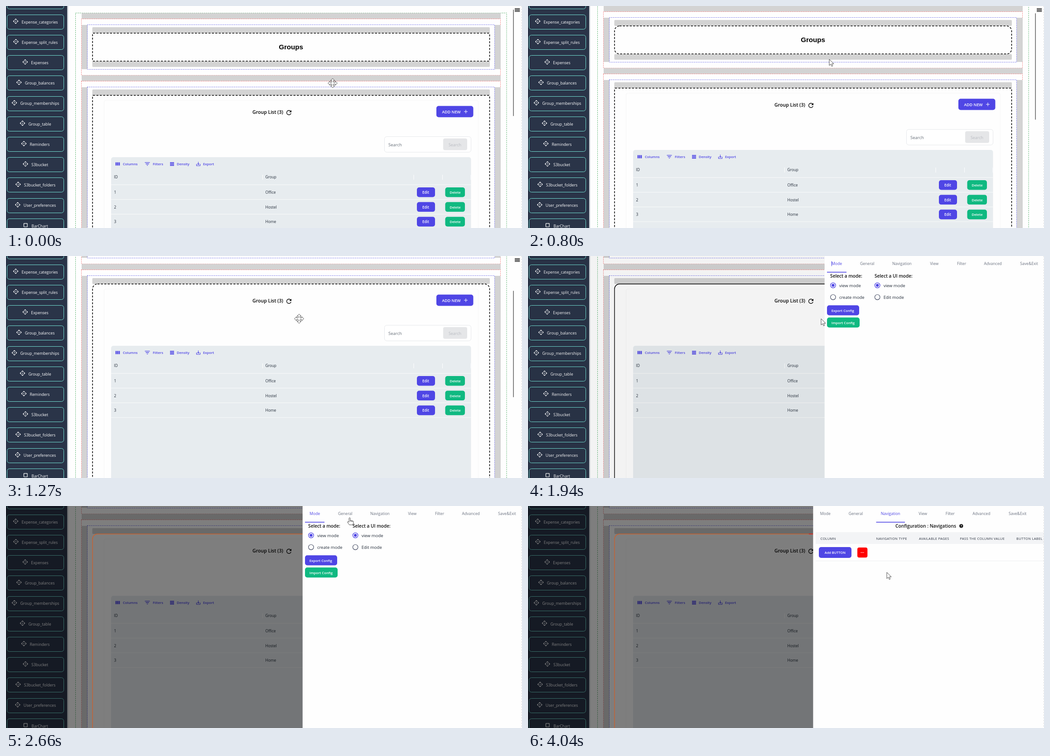
Write an HTML page that moves like this. It is 1139 by 492 pixels and loops after 4.11 s.

```html
<!DOCTYPE html>
<html lang="en">
<head>
<meta charset="utf-8">
<title>Page builder</title>
<style>
html, body { margin: 0; width: 100%; height: 100%; overflow: hidden; background: #fff; }
svg { display: block; width: 100vw; height: 100vh; }
text { font-family: "Open Sans", "Noto Sans", sans-serif; white-space: pre; }
</style>
</head>
<body>
<svg id="stage" viewBox="0 0 1139 492" preserveAspectRatio="none"></svg>
<script>
const LOOP = 4110;
const INDIGO = '#4f46e5', GREEN = '#10b981', GRAY = '#d3d3d3', INK = '#222b38';

// ---- markup helpers
const rect = (x, y, w, h, fill, rx = 0, more = '') =>
  `<rect x="${x}" y="${y}" width="${w}" height="${h}" rx="${rx}" fill="${fill}" ${more}/>`;
const frame = (x, y, w, h, color, dash, more = '') =>
  rect(x, y, w, h, 'none', 0, `stroke="${color}" stroke-dasharray="${dash}" ${more}`);
const path = (d, more) => `<path d="${d}" ${more}/>`;
const text = (x, y, s, size, fill = INK, weight = 400, more = '') =>
  `<text x="${x}" y="${y}" font-size="${size}" fill="${fill}" font-weight="${weight}" ${more}>${s}</text>`;
const button = (x, y, w, h, fill, label, tx, ty, size = 7.7) =>
  rect(x, y, w, h, fill, 5) + text(tx, ty, label, size, '#fff', 600);

// ---- sidebar
function sidebar() {
  const names = ['', 'Expense_categories', 'Expense_split_rules', 'Expenses', 'Group_balances',
    'Group_memberships', 'Group_table', 'Reminders', 'S3bucket', 'S3bucket_folders',
    'User_preferences', 'BarChart'];
  const rows = names.map((name, i) => {
    const y = 35.3 + 45.2 * (i - 1);
    return rect(2.5, Math.floor(y - 16) + .5, 125, 32, 'none', 5, 'stroke="#72ded2"') +
      text(74.5, y + 3.3, name, 8.75, '#fff', 500, 'class="item" text-anchor="middle"');
  });
  return rect(0, 0, 135, 492, '#2a3448') + rect(135, 0, 2.5, 492, '#cfd3d9') + rows.join('');
}

function arrows() {
  let out = '<circle r="1" fill="#fff"/>';
  for (let a = 0; a < 360; a += 90)
    out += path('M-2.1-3L0-5.1 2.1-3', `transform="rotate(${a})" fill="none" stroke="#fff" stroke-width="1.3"`);
  return out;
}

function addIcons() {
  document.querySelectorAll('.item').forEach(el => {
    const label = el.textContent;
    if (!label) return;
    const icon = label === 'BarChart'
      ? rect(-3.8, -3.8, 7.6, 7.6, 'none', .5, 'stroke="#fff" stroke-width="1.2"')
      : arrows();
    const x = 74.5 - el.getComputedTextLength() / 2 - 13, y = el.getAttribute('y') - 4.9;
    el.insertAdjacentHTML('afterend', `<g transform="translate(${x},${y})">${icon}</g>`);
  });
}

// ---- page canvas
const box = (id, y, h) => rect(191, y, 876.5, h, 'none', 1,
  `id="${id}" stroke="#000" stroke-width="1.5" stroke-dasharray="4.5 3"`);

function section(y, h) {
  return frame(166.5, y, 925, h, '#f26a6a', '2 2') +
    rect(167, y + 13.5, 13, h - 27, GRAY, 1) + rect(1079, y + 13.5, 13, h - 27, GRAY, 1) +
    frame(179.5, y + 13, 899, h - 26, '#5f5fe6', '2 2') +
    rect(190.5, y + 18.5, 877.5, 13, GRAY, 2);
}

function toolbar() {
  const stroke = `stroke="${INDIGO}" fill="none"`;
  return path('M243 346.5v7M246.5 346.5v7M250 346.5v7', stroke + ' stroke-width="2.6"') +
    path('M306.5 346.8h11M308.5 350h7M310.8 353.2h2.5', stroke + ' stroke-width="1.3"') +
    path('M362 347.2h9M362 350.2h9M362 353.2h9', stroke + ' stroke-width="2"') +
    path('M420.5 350v4h8v-4M424.5 345.5v6M422.5 349.5l2 2 2-2', stroke + ' stroke-width="1.1"') +
    [['Columns', 258], ['Filters', 324], ['Density', 377], ['Export', 435]]
      .map(([s, x]) => text(x, 353, s, 7.7, INDIGO, 600)).join('');
}

function table() {
  let out = rect(232, 335, 794.5, 400, '#e7ecef', 5) + toolbar() +
    text(238.5, 382, 'ID', 8.3) + text(572.5, 382, 'Group', 8.3);
  for (const x of [566.5, 900, 963.5, 1026]) out += rect(x - .6, 374, 1.2, 11, '#fafbfc');
  ['Office', 'Hostel', 'Home'].forEach((name, i) => {
    const y = 396 + 32.6 * i;
    out += text(238.5, y + 20, i + 1, 8.4) + text(572.5, y + 20, name, 8.4) +
      button(907, y + 6, 40, 21.5, INDIGO, 'Edit', 919, y + 20, 8) +
      button(969.5, y + 6, 43.5, 21.5, GREEN, 'Delete', 979.5, y + 20, 7.7);
  });
  for (let i = 0; i < 4; i++) out += rect(232, 395.6 + 32.6 * i, 794.5, 1.1, '#f8fafa');
  return out;
}

const REFRESH = 'M17.65 6.35C16.2 4.9 14.21 4 12 4a8 8 0 1 0 7.73 10h-2.08A6 6 0 1 1 12 6c1.66 0 3.14.69 4.22 1.78L13 11h7V4z';

function page() {
  return frame(153.5, 15.5, 951.5, 900, '#54b06a', '2.5 2') +
    rect(167, 15.5, 925, 13, GRAY, 1) + section(28.5, 125) + rect(190.5, 122.5, 877.5, 12.5, GRAY, 2) +
    rect(167, 153.5, 925, 13, GRAY, 1) + section(166.5, 800) +
    rect(191, 60.5, 877, 62, '#fefefe') +
    text(629, 96, 'Groups', 15.1, '#000', 700,
      'text-anchor="middle" style="font-family:\'Liberation Sans\',Arial,sans-serif"') +
    rect(216.5, 209, 826, 600, 'none', 4, 'stroke="#f6f6f6"') +
    box('groups', 60.3, 62) + box('list', 198, 520) +
    text(544, 239, 'Group List (3)', 10.55, '#000', 600) +
    path(REFRESH, 'transform="translate(616.2,228) scale(.69)" fill="#000"') +
    button(950, 221.5, 81.5, 25, INDIGO, 'ADD NEW', 962.5, 237.5, 8.8) +
    path('M1011 234h8M1015 230v8', 'stroke="#fff"') +
    rect(835.5, 289.5, 191, 34.5, '#fff', 5, 'stroke="#e6e8eb"') + text(844, 311, 'Search', 9.5, '#666e78') +
    rect(965, 293.5, 53, 26, '#e5e6e8', 4) + text(977, 311, 'Search', 8.9, '#b9bcc2') +
    table();
}

// ---- settings drawer
function modeView() {
  const column = (x, title, second) =>
    text(x - 6.3, 48, title, 10.1, '#111', 600) +
    `<circle cx="${x}" cy="65" r="5.7" fill="none" stroke="${INDIGO}" stroke-width="1.3"/>
     <circle cx="${x}" cy="65" r="3.2" fill="${INDIGO}"/>
     <circle cx="${x}" cy="91.2" r="5.7" fill="none" stroke="#4b5268" stroke-width="1.2"/>` +
    text(x + 13.5, 69, 'view mode', 9.5) + text(x + 13.5, 95.3, second, 9.5);
  return column(673.4, 'Select a mode:', 'create mode') + column(771.2, 'Select a UI mode:', 'Edit mode') +
    button(660, 109.3, 71, 22.2, INDIGO, 'Export Config', 669.8, 124) +
    button(660, 136.2, 72, 22.2, GREEN, 'Import Config', 669.8, 151);
}

function navView() {
  const heads = [['COLUMN', 645.5], ['NAVIGATION TYPE', 768.5], ['AVAILABLE PAGES', 863],
    ['PASS THE COLUMN VALUE', 953.5], ['BUTTON LABEL', 1078]];
  return text(878, 48, 'Configuration : Navigations', 10.2, '#111', 600, 'text-anchor="middle"') +
    '<circle cx="956.3" cy="44.3" r="4.2" fill="#111"/>' +
    text(956.3, 47, '?', 7, '#fff', 700, 'text-anchor="middle"') +
    rect(635, 58, 504, 26, '#f3f4f6') +
    heads.map(([s, x]) => text(x, 74.7, s, 7.5, '#2c3340', 500, 'letter-spacing=".35"')).join('') +
    button(642, 91, 72, 24, INDIGO, 'Add BUTTON', 654.8, 106.2, 7.4) +
    rect(727, 92, 22.3, 22.3, '#f00', 4) + rect(734, 102.6, 8, 1, '#ffc9c9') +
    rect(635, 121.3, 504, 1, '#eeeff1');
}

const TABS = [['Mode', 670], ['General', 733], ['Navigation', 804], ['View', 887.5],
  ['Filter', 947], ['Advanced', 1006.5], ['Save&amp;Exit', 1086.3]];

const drawer = () => rect(654.7, 0, 510, 492, '#fefefe', 0, 'id="sheet"') +
  `<g id="tabs">${TABS.map(([s, x]) => text(x, 20.3, s, 8.6, '#6b7280', 400, 'class="tab"')).join('')}
   ${rect(669.8, 11.5, 1, 11, INDIGO, 0, 'id="caret"')}</g>
   ${rect(660, 35, 43, 1.6, INDIGO, 0, 'id="bar"')}
   <g id="mode">${modeView()}</g><g id="nav">${navView()}</g>`;

// ---- pointers
function moveShape() {
  const corner = [[0, -10.3], [4.6, -5.8], [1.9, -5.8], [1.9, -1.9], [5.8, -1.9], [5.8, -4.6]];
  const pts = [];
  for (let q = 0; q < 4; q++)
    for (let [x, y] of corner) {
      for (let i = 0; i < q; i++) [x, y] = [-y, x];
      pts.push(x + ' ' + y);
    }
  return `M${pts.join('L')}Z`;
}
const POINTERS = {
  move: moveShape(),
  arrow: 'M0 0V13.8L3.3 10.9 5.5 15.8 7.7 14.8 5.6 10.1H10Z',
  hand: 'M-1.4 1.4A1.4 1.4 0 0 1 1.4 1.4V6L7.2 7.2Q9 7.8 8.7 9.8L7.2 15.8H-.5L-4.6 10.4Q-5 8.6-3.4 8.5L-1.4 10ZM1.4 6V8.5M3.8 6.8V9M6.2 7.2V9.4'
};

const $ = id => document.getElementById(id);
const set = (id, attrs) => { for (const k in attrs) $(id).setAttribute(k, attrs[k]); };
const show = (id, on) => set(id, { visibility: on ? 'visible' : 'hidden' });

$('stage').innerHTML = rect(0, 0, 1139, 492, '#fefefe') +
  `<g id="page">${page()}</g>` +
  rect(1119.3, 8, 1.7, 236, '#707070', .8, 'id="thumb"') +
  path('M1123 5.8h11.3M1123 8.9h11.3M1123 12h11.3', 'stroke="#111" stroke-width="1.6"') +
  sidebar() +
  rect(0, 0, 1139, 492, '#000', 0, 'id="shade"') +
  rect(191, 62, 876.5, 520, 'none', 11, 'id="picked" stroke-width="1.4"') +
  rect(620, 61.3, 10, 1.4, '#e01818', 0, 'id="mark"') +
  `<g id="drawer">${drawer()}</g>` +
  path('M1138.5 0V492', 'stroke="#dcdcdc" stroke-dasharray="3 3"') +
  path('', 'id="pointer" fill="#fff" stroke="#222" stroke-width=".8" stroke-linejoin="round"');
addIcons();

// ---- timing: bursts of screen updates as [start, end, steps]
const BURSTS = [[260, 730, 8], [800, 1270, 8], [1530, 1600, 2], [1860, 2340, 8],
  [2400, 2860, 7], [2930, 3080, 3], [3350, 3830, 7], [3900, 4040, 3]];

function snap(t) {
  const b = BURSTS.filter(([start]) => start <= t).pop();
  if (!b) return 0;
  const [start, end, n] = b, d = (end - start) / (n - 1);
  return start + d * Math.min(n - 1, Math.floor((t - start) / d + .01));
}

function track(keys, t) {
  let i = keys.findIndex(k => k[0] > t);
  if (i < 0) return keys[keys.length - 1].slice(1);
  if (i === 0) return keys[0].slice(1);
  const a = keys[i - 1], b = keys[i], p = (t - a[0]) / (b[0] - a[0]);
  return a.slice(1).map((v, j) => v + (b[j + 1] - v) * p);
}

const SCROLL = [[730, 0], [800, 16], [867, 50], [935, 90], [1002, 116], [1070, 130], [1137, 136]];
const SHADE = [[1900, 0], [1928, .04], [1997, .37], [2066, .47], [2134, .5]];
const EDGE = [[1928, 0, 0, 0], [1997, 74, 36, 20], [2134, 200, 98, 48]];
const POINTER = [[200, 721, 171], [730, 667, 118], [800, 665, 118], [1270, 647, 139], [2130, 647, 139],
  [2400, 692, 84], [2630, 758.5, 26], [2860, 764, 25], [3080, 812.5, 25.5], [3500, 812.5, 25.5],
  [3830, 801, 92], [4040, 792, 147]];
const KINDS = [[0, 'move'], [380, 'arrow'], [590, 'move'], [795, 'arrow'], [990, 'move'],
  [1530, 'arrow'], [2540, 'hand'], [3620, 'arrow']];

function draw(now) {
  const t = snap(now % LOOP);
  const [scroll] = track(SCROLL, t);
  set('page', { transform: `translate(0,${-scroll})` });
  set('thumb', { y: 8 + scroll * .507 });

  const picked = t >= 1860;
  set('groups', { rx: t >= 590 && t < 860 ? 11 : 1 });
  set('list', { rx: t >= 990 ? 11 : 1 });
  show('list', !picked);
  show('picked', picked);
  set('picked', { stroke: `rgb(${track(EDGE, t).map(Math.round)})` });
  set('shade', { opacity: track(SHADE, t)[0] });

  const open = t >= 1900, nav = t >= 3350;
  const dx = nav ? -25.3 : 0;
  set('drawer', { display: open ? 'inline' : 'none' });
  set('sheet', { x: 654.7 + dx });
  set('tabs', { transform: `translate(${dx},0)` });
  document.querySelectorAll('.tab').forEach((el, i) =>
    el.setAttribute('fill', i === (nav ? 2 : 0) ? INDIGO : '#6b7280'));
  const [x, width] = nav ? track([[3350, 650, 50], [3650, 768.5, 63.5]], t) : [660, 43];
  set('bar', { x, width });
  set('mode', { display: nav ? 'none' : 'inline' });
  set('nav', { display: nav ? 'inline' : 'none' });
  show('mark', nav);
  show('caret', t < 2400 || (t >= 2930 && t < 3900));

  const [px, py] = track(POINTER, t);
  set('pointer', {
    d: POINTERS[KINDS.filter(k => k[0] <= t).pop()[1]],
    transform: `translate(${px},${py})`
  });
}

const begin = performance.now();
function tick() {
  draw(performance.now() - begin);
  requestAnimationFrame(tick);
}
tick();
</script>
</body>
</html>
```
